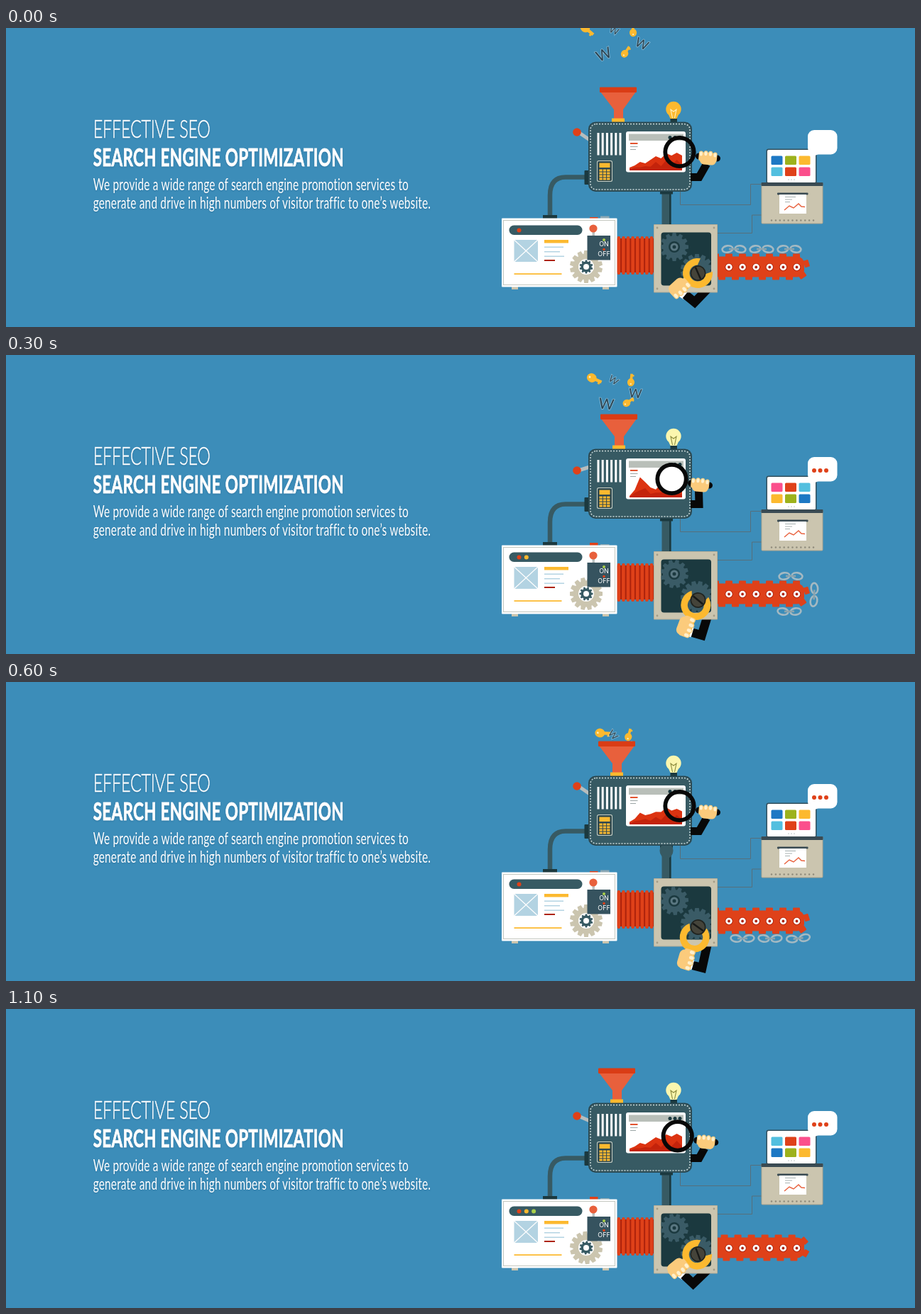
An HTML page with a canvas that plays this animation: 1280x422 px, repeating every 1.2 s.

```html
<!DOCTYPE html>
<html lang="en">
<head>
<meta charset="utf-8">
<title>Search engine optimization</title>
<style>
  html, body { margin: 0; width: 100%; height: 100%; overflow: hidden; background: #3c8db9; }
  canvas, svg { position: absolute; left: 0; top: 0; display: block; }
  svg { filter: drop-shadow(0 1px 1px rgba(0, 40, 80, .22)); }
  text { fill: #fff; stroke: #fff; font-family: Lato, "Open Sans", sans-serif; }
  .lead { font-size: 35px; font-weight: 300; letter-spacing: -.4px; stroke-width: .5px; }
  .head { font-size: 33.5px; font-weight: 700; letter-spacing: .5px; stroke-width: .9px; }
  .copy { font-size: 23px; font-weight: 400; letter-spacing: .29px; stroke-width: 0; }
</style>
</head>
<body>
<canvas id="stage" width="1280" height="422"></canvas>
<svg width="1280" height="422">
  <g transform="translate(122 0) scale(.67 1)">
    <text class="lead" x="1" y="155.5">EFFECTIVE SEO</text>
    <text class="head" x="1" y="195.5">SEARCH ENGINE OPTIMIZATION</text>
    <text class="copy" x="1" y="229">We provide a wide range of search engine promotion services to</text>
    <text class="copy" x="1" y="255">generate and drive in high numbers of visitor traffic to one’s website.</text>
  </g>
</svg>
<script>
const ctx = document.getElementById('stage').getContext('2d');
const STEPS = 12, STEP_MS = 100, TAU = Math.PI * 2;
const C = {
  sky: '#3c8db9', teal: '#375a63', deep: '#1b393f', gear: '#3a5b66', beige: '#cbc5af',
  red: '#df4119', dark: '#ad230c', coral: '#e8603c', amber: '#fcb92f', skin: '#fbcb7c',
  nail: '#fff0cc', pale: '#b3d3e2', black: '#080808', grey: '#b9bfb9', wire: '#566f7b'
};
const DROP = [0, 5, 18, 32, 55, 63, 71, 90];
const TAIL = [24, 31, 66, 104, 148, 159, 170, 200, 232, 265, 310, 340];
const RISING = [197, 194, 189, 191, 186, 181, 184, 177, 180, 176, 180];
const PEAKED = [199, 190, 172, 179, 187, 190, 182, 178, 186, 188, 190];

const wave = (k, peak, period) => Math.cos(TAU * (k - peak) / period);

function rect(x, y, w, h, fill, r = 0) {
  ctx.beginPath();
  ctx.roundRect(x, y, w, h, r);
  ctx.fillStyle = fill;
  ctx.fill();
}
function dot(x, y, r, fill, ry = r) {
  ctx.beginPath();
  ctx.ellipse(x, y, r, ry, 0, 0, TAU);
  ctx.fillStyle = fill;
  ctx.fill();
}
function trace(pts) {
  ctx.beginPath();
  for (let i = 0; i < pts.length; i += 2) ctx.lineTo(pts[i], pts[i + 1]);
}
function poly(fill, ...pts) {
  trace(pts);
  ctx.fillStyle = fill;
  ctx.fill();
}
function line(color, width, ...pts) {
  trace(pts);
  ctx.strokeStyle = color;
  ctx.lineWidth = width;
  ctx.stroke();
}
function at(x, y, angle, draw, size = 1) {
  ctx.save();
  ctx.translate(x, y);
  ctx.rotate(angle);
  ctx.scale(size, size);
  draw();
  ctx.restore();
}
function gear(x, y, r, teeth, angle, fill) {
  at(x, y, angle, () => {
    dot(0, 0, r * .8, fill);
    for (let i = 0; i < teeth; i++) {
      ctx.rotate(TAU / teeth);
      poly(fill, -r * .17, -r * .7, -r * .12, -r, r * .12, -r, r * .17, -r * .7);
    }
  });
}
function hand(x, y, angle, size) {
  at(x, y, angle, () => {
    rect(-11, -5, 23, 17, C.skin, 6);
    for (let i = 0; i < 4; i++) {
      const fx = -13 + i * 6.6;
      rect(fx, -8 + Math.abs(i - 1.5), 6, 14, C.skin, 3);
      rect(fx + 1, -7 + Math.abs(i - 1.5), 4, 6, C.nail, 2);
    }
  }, size);
}

// Point on the belt outline: top run, round end, bottom run.
function belt(s, r, bend) {
  const run = 112;
  if (s < run) return [1001 + s, 337 - r, 0];
  if (s < run + bend) {
    const a = (s - run) / bend * Math.PI;
    return [1113 + r * Math.sin(a), 337 - r * Math.cos(a), a];
  }
  return [1113 - (s - run - bend), 337 + r, Math.PI];
}

function fallingItems(k) {
  const d = DROP[k];
  if (d === undefined) return;
  ctx.save();
  ctx.beginPath();
  ctx.rect(790, 0, 130, 85);
  ctx.clip();
  const key = (x, y, drift, angle, size) => at(x + drift * d, y + d, angle, () => {
    line(C.amber, 4.5, 0, 0, 13, 0);
    line(C.amber, 3, 10, 0, 10, 4.5);
    dot(-2, 0, 7, C.amber, 6.3);
    dot(-5, 0, 1.4, '#fff0c0');
  }, size);
  const letter = (x, y, drift, angle, size) => at(x + drift * d, y + d, angle, () => {
    ctx.font = size + 'px Lato, sans-serif';
    ctx.textAlign = 'center';
    ctx.textBaseline = 'middle';
    ctx.strokeStyle = 'rgba(215,232,240,.5)';
    ctx.lineWidth = 1.6;
    ctx.strokeText('W', 0, 0);
    ctx.fillStyle = '#2b4350';
    ctx.fillText('W', 0, 0);
  });
  key(817, 1, .3, .7 - d * .009, 1);
  key(883, 5, -.09, -1.6 + d * .004, .8);
  key(872, 35, .1, -1 + d * .012, .8);
  letter(856, 4, -.02, .4 + d * .006, 13);
  letter(895, 23, -.28, .45 - d * .011, 18);
  letter(842, 38, .1, -.4 + d * .016, 21);
  ctx.restore();
}

function funnel(k) {
  const x = 835 + Math.round(2 * wave(k, 2.5, STEPS));
  poly(C.coral, x + 1, 90, x + 51, 90, x + 33, 115, x + 33, 128, x + 20, 128, x + 20, 115);
  rect(x, 83.5, 52, 7.5, '#da3c15', 1);
  rect(x + 17, 127.5, 18, 7, C.amber);
}

function bulb(lit) {
  rect(935.5, 125, 9.5, 9, C.deep, 1);
  dot(940, 114.5, 10.7, lit ? '#fbf6ae' : C.amber);
  poly(lit ? '#fbf6ae' : C.amber, 932, 120, 948, 120, 944.5, 128, 935.5, 128);
  line(lit ? '#8a8a3c' : '#fff3c4', 1.1, 938.5, 127, 936, 115, 940, 118, 944, 115, 941.5, 127);
}

function belts(k) {
  const shift = (k % 3) * 6.3;
  for (let s = -2 + shift; s < 285; s += 19) {
    const [x, y, a] = belt(s, 15, 47);
    at(x, y, a, () => rect(-5, -3.5, 10, 7, C.red, 1));
  }
  rect(990, 322.5, 134, 29, C.red, [0, 10, 10, 0]);
  for (let i = 0; i < 6; i++) {
    const x = 1018 + i * 19.1;
    dot(x, 337.5, 5.6, C.dark);
    dot(x, 337.5, 4.7, '#fff');
    dot(x, 337.5, 1.9, C.dark);
  }
  for (let i = 0; i < 3; i++) {
    const [x, y, a] = belt(TAIL[k] + i * 39, 25, 60);
    if (x > 975) at(x, y, a, links);
  }
}
function links() {
  for (const side of [-1, 1]) {
    ctx.beginPath();
    ctx.ellipse(side * 9, 0, 7.5, 4.7, side * .15, 0, TAU);
    ctx.strokeStyle = '#a4b9c2';
    ctx.lineWidth = 2.6;
    ctx.stroke();
  }
  line('#8ba3ad', 2.6, -7, 0, 7, 0);
}

function wires() {
  line(C.wire, 1, 949.5, 230, 949.5, 249.5, 1048.5, 249.5, 1048.5, 220.5, 1065, 220.5);
  line(C.wire, 1, 1000, 289.5, 1050.5, 289.5, 1050.5, 264, 1066, 264);
}

function pipes(k) {
  ctx.beginPath();
  ctx.moveTo(818, 210.5);
  ctx.lineTo(788, 210.5);
  ctx.quadraticCurveTo(766, 210.5, 766, 236);
  ctx.lineTo(766, 266);
  ctx.strokeStyle = C.teal;
  ctx.lineWidth = 6.5;
  ctx.stroke();
  rect(756, 264, 20, 5.5, C.deep);
  rect(814.5, 201, 7, 20, C.deep, 1);

  ctx.save();
  ctx.beginPath();
  ctx.rect(915, 230, 30, 48);
  ctx.clip();
  rect(923.5, 230, 13, 48, C.teal);
  rect(934, 230, 2.5, 48, C.deep);
  rect(921, 230, 18, 4.5, C.deep);
  if (k > 4 && k < 11) dot(930, 238 + (k - 6) * 10.7, 9.5, C.teal, 11);
  ctx.restore();
}

function lever(k) {
  const y = 155 - 8 * wave(k, 0, 6);
  line('#b7bdbd', 5, 806, y, 822, 158);
  dot(804, y, 5.8, C.red);
}

function mainUnit(k) {
  rect(820, 132.5, 146, 98.5, '#2b4851', 10);
  rect(821.5, 134, 143, 95.5, C.teal, 9);
  ctx.beginPath();
  ctx.roundRect(823, 135.5, 140, 92.5, 8);
  ctx.setLineDash([2, 2]);
  ctx.strokeStyle = '#c9d6d6';
  ctx.lineWidth = 1.5;
  ctx.stroke();
  ctx.setLineDash([]);
  for (let i = 0; i < 6; i++) rect(832.5 + i * 6.2, 148, 3, 31.5, '#fff');

  rect(832, 187, 22, 30, '#c9d0c4', 2.5);
  rect(833, 188, 20, 28, '#2e4850', 2);
  rect(835.5, 190.5, 15, 6.5, C.amber);
  for (let i = 0; i < 12; i++)
    rect(835.5 + (i % 3) * 5.3, 199.5 + (i / 3 | 0) * 4, 4.3, 3, C.amber);

  rect(873, 146, 84, 57.5, '#fff', 3);
  rect(877, 149.5, 77, 9.5, C.grey);
  for (const x of [935, 942, 949]) dot(x, 154.5, 2.5, C.deep);
  rect(879, 162, 10.5, 1.8, C.red);
  rect(879, 167, 10.5, 1, '#9aa5a5');
  rect(879, 171, 8, 1, '#9aa5a5');

  const mix = Math.max(0, wave(k, 3.5, STEPS));
  const tops = RISING.flatMap((y, i) => [878 + i * 7.4, y + (PEAKED[i] - y) * mix]);
  poly('#dc3311', 878, 201, ...tops, 952, 201);
  const low = tops.map((v, i) => i % 2 ? 201 - (201 - v) * (i % 4 == 1 ? .35 : .6) : v);
  poly('#c4230b', 878, 201, ...low, 952, 201);
}

function magnifier(k) {
  const x = 943 + 5.5 * wave(k, 0, 6), y = 175 - 5 * wave(k, 1.5, 6);
  line(C.black, 11, 964, 210.5, 976, 210.5, x + 38, y + 17);
  ctx.lineCap = 'round';
  line(C.black, 9, x + 27, y + 6, x + 53, y + 9);
  ctx.lineCap = 'butt';
  if (x < 939) dot(x, y, 20, '#fff');
  ctx.beginPath();
  ctx.arc(x, y, 20.2, 0, TAU);
  ctx.strokeStyle = C.black;
  ctx.lineWidth = 5.8;
  ctx.stroke();
  hand(x + 40, y + 6, .1, 1);
}

function whiteUnit(k) {
  rect(712, 364, 9, 5, C.beige);
  rect(840, 364, 9, 5, C.beige);
  const up = k % 2;
  rect(822, up ? 265 : 267, 11.5, 5, C.red);
  rect(837, up ? 267 : 265.5, 12.5, 5, '#8fa9b4');
  rect(698, 268.5, 162.5, 97, '#fff', 1);
  ctx.strokeStyle = '#c5c8c0';
  ctx.lineWidth = 1;
  ctx.strokeRect(700.5, 271.5, 157, 91);

  rect(708.5, 278.5, 103, 13.5, C.teal, 6.7);
  const lamps = [C.red, C.amber, '#a9d04a'];
  for (let i = 0; i <= (k % 6) >> 1; i++) dot(722.5 + i * 10.3, 285.5, 3, lamps[i]);

  rect(715.5, 299, 33.5, 31, C.pale);
  line('#fff', 1.2, 715.5, 299, 749, 330);
  line('#fff', 1.2, 749, 299, 715.5, 330);
  rect(758, 299, 34, 4.5, C.amber);
  rect(758, 308.5, 27, 1.5, C.pale);
  rect(758, 315, 22, 1.5, C.pale);
  rect(758, 321.5, 28, 1.5, C.pale);
  rect(758, 327, 15, 2, C.dark);
  rect(715.5, 346.3, 67, 1.7, C.amber);

  gear(817, 337, 23, 14, k * TAU / 84, C.beige);
  dot(817, 337, 11, '#fff');
  gear(817, 337, 9.5, 10, -k * TAU / 60, C.teal);
  dot(817, 337, 4, '#fff');

  rect(825.5, 286, 3.5, 10, '#b9bfbf');
  dot(827, 283, 5.6, C.coral);
  rect(818.5, 293, 32.5, 34.5, '#36535f');
  dot(842, 299, 2, '#a9d04a');
  dot(842, 312.5, 1.8, C.red);
  ctx.font = '9px Inter, sans-serif';
  ctx.textAlign = 'center';
  ctx.textBaseline = 'alphabetic';
  ctx.fillStyle = '#fff';
  ctx.fillText('ON', 842, 308);
  ctx.fillText('OFF', 842, 321.5);
}

function bellows() {
  rect(860, 297, 53, 48, C.dark);
  for (let i = 0; i < 8; i++) rect(860.5 + i * 6.6, 294, 4.6, 54, C.red, 2);
}

function cabinet(k) {
  rect(912, 277, 90, 96.5, '#b5ae98', 1);
  rect(913, 278, 88, 94.5, C.beige);
  for (const x of [917, 997]) for (const y of [282, 368]) dot(x, y, 1.4, '#a39d88');
  rect(922.5, 288.5, 70.5, 75, C.deep, 4);
  ctx.save();
  ctx.beginPath();
  ctx.rect(922.5, 288.5, 70.5, 75);
  ctx.clip();
  const turn = k * TAU / 84;
  gear(941, 309, 20, 12, turn, C.gear);
  dot(941, 309, 8, C.deep);
  dot(941, 309, 5.5, '#5a7781');
  dot(941, 309, 2.5, C.deep);
  gear(973, 342, 23, 14, -turn, C.gear);
  ctx.restore();
}

function wrenchPose(k) {
  const angle = (122 + 19 * wave(k, 10.8, STEPS)) * Math.PI / 180;
  const slide = 7.5 - 7.5 * wave(k, 0, STEPS), reach = 33 + slide;
  return { angle, slide, x: 974 + reach * Math.cos(angle), y: 346 + reach * Math.sin(angle) };
}
function wrenchArm({ x, y }) {
  const bend = y + 8 + (965 - x) * .7;
  line('#fff', 13.5, x + 2, y + 5, x + 8, y + 9);
  line(C.black, 12.5, x + 7, y + 8, x + 20, bend, 988, 368);
}
function wrench({ angle, slide, x, y }) {
  at(974, 346, angle, () => {
    ctx.beginPath();
    ctx.arc(slide, 0, 21, -2.5, 2.5);
    ctx.arc(slide, 0, 11.5, 2.3, -2.3, true);
    ctx.closePath();
    ctx.fillStyle = C.amber;
    ctx.fill();
    rect(slide + 17, -7, 27, 14, C.amber, 5);
  });
  at(974.5, 346, angle + 1.9, () => {
    dot(0, 0, 11, '#20231f');
    dot(0, 0, 9.3, '#45443a');
    line('#171917', 2.4, -9, 0, 9, 0);
  });
  hand(x, y, angle, 1.15);
}

function laptop(k, lit) {
  rect(1070.5, 170.5, 71, 50, '#34505d', 3);
  rect(1072, 172, 68, 46.5, '#fff', 2);
  const tiles = ['#1d78c4', '#9db21c', C.amber, '#52bfdf', C.red, '#fb4f8c'];
  const mode = (k % 6) >> 1;
  for (let i = 0; i < 6; i++) {
    const pick = mode == 0 ? i : mode == 1 ? 5 - i : (i + 3) % 6;
    rect(1077.5 + (i % 3) * 19.5, i < 3 ? 180.5 : 196.5, 16, 12.5, tiles[pick], 1.5);
  }
  for (let i = 0; i < 3; i++) dot(1102 + i * 4, 214, .8, '#b7c0c0');

  rect(1063.5, 218, 87, 58.5, '#aaa48f', 2);
  rect(1064.5, 222, 85, 53.5, C.beige);
  rect(1063.5, 218, 87, 5, '#3a4b53', 1);
  rect(1086, 232.5, 43.5, 3, '#3a4b53', 1);
  rect(1089, 235, 38, 27, '#fff');
  rect(1097, 238, 15, 1, '#a8b1b1');
  rect(1097, 241.5, 10, 1, '#a8b1b1');
  rect(1097, 245, 7, 1, '#a8b1b1');
  line(C.coral, 1.4, 1096, 257, 1103, 251, 1109, 254, 1116, 248, 1120, 252, 1125, 252.5);
  for (let i = 0; i < 11; i++) dot(1078 + i * 5.9, 271.5, 1.2, '#8f8b7b');

  poly('#fff', 1132, 172, 1135, 182, 1146, 177);
  rect(1129, 144, 41.5, 34.5, '#fff', 9);
  if (lit) for (let i = 0; i < 3; i++) dot(1138 + i * 8.5, 163, 3, C.red);
}

function draw() {
  const k = Math.floor(performance.now() % (STEPS * STEP_MS) / STEP_MS);
  const lit = k % 4 > 1, pose = wrenchPose(k);
  rect(0, 0, 1280, 422, C.sky);
  fallingItems(k);
  wires();
  belts(k);
  pipes(k);
  lever(k);
  funnel(k);
  bulb(lit);
  mainUnit(k);
  magnifier(k);
  bellows();
  whiteUnit(k);
  wrenchArm(pose);
  cabinet(k);
  wrench(pose);
  laptop(k, lit);
  requestAnimationFrame(draw);
}
draw();
</script>
</body>
</html>
```
